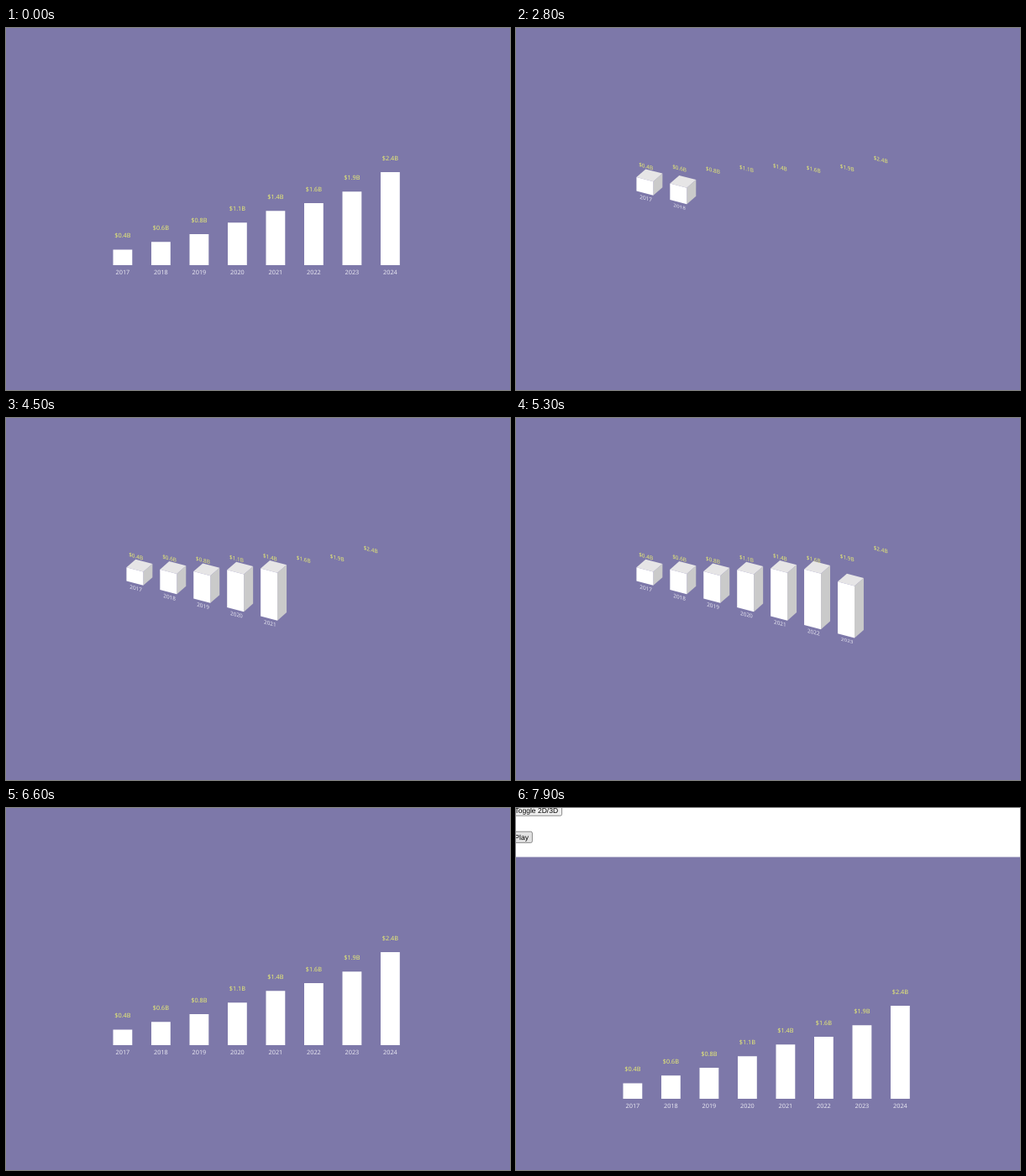
Animation of 600 by 432 pixels, one loop 8000 ms. Source, as an HTML page with a canvas:

```html
<!DOCTYPE html>
<html lang="en">
<head>
<meta charset="utf-8">
<title>Revenue bars</title>
<style>
  html, body { margin: 0; width: 100%; height: 100%; overflow: hidden; background: #7d78a9; }
  canvas { display: block; width: 600px; height: 432px; }
</style>
</head>
<body>
<canvas id="stage"></canvas>
<script>
const W = 600, H = 432, LOOP = 8000, STEP = 100;
const PLAY = 2000, STOP = 6000, SPIN = 530;
const STAGGER = 500, GROW = 1000, TILT = 0.5;
const SCROLL_AT = 7600, SCROLL_TIME = 300, SCROLL = 64;

const VALUES = [0.4, 0.6, 0.8, 1.1, 1.4, 1.6, 1.9, 2.4];
const LEFT = 127.5, PITCH = 45.5, BAR = 22.8, BASE = 283, UNIT = 46.25;
const FRONT = -2.5, BACK = FRONT + BAR;
const CAP = 5.2;
const COLORS = {
  bg: '#7d78a9', front: '#ffffff', top: '#e6e5e6', side: '#cacaca',
  value: '#eff470', year: '#eeedf5'
};

const canvas = document.getElementById('stage');
const ctx = canvas.getContext('2d');
const dpr = window.devicePixelRatio || 1;
canvas.width = W * dpr;
canvas.height = H * dpr;
if ('textRendering' in ctx) ctx.textRendering = 'geometricPrecision';

const clamp = v => Math.min(1, Math.max(0, v));
const cubicOut = p => 1 - (1 - p) ** 3;
const smooth = p => p * p * (3 - 2 * p);
const backOut = p => 1 + 2 * (p - 1) ** 3 + (p - 1) ** 2;

function tiltAt(t) {
  const go = cubicOut(clamp((t - PLAY) / SPIN));
  const back = cubicOut(clamp((t - STOP) / SPIN));
  return TILT * (go - back);
}

function growthAt(t, i) {
  if (t <= PLAY) return 1;
  return backOut(clamp((t - PLAY - i * STAGGER) / GROW));
}

// Orthographic view, turned and pitched by the same angle
function makeView(angle) {
  const c = Math.cos(angle), s = Math.sin(angle);
  const project = (x, y, z) => [
    x * c + 140 * (1 - c) + (32.5 + z) * s,
    y * c + 138.7 * (1 - c) + (x - 140) * s * s - (163.8 + z) * c * s
  ];
  return { c, s, project };
}

function face(view, color, corners) {
  ctx.fillStyle = color;
  ctx.beginPath();
  for (const p of corners) ctx.lineTo(...view.project(...p));
  ctx.fill();
}

// Text hangs from its top edge y
function label(view, text, x, y, color, stretch = 1) {
  const { c, s, project } = view;
  ctx.save();
  ctx.transform(c, s * s, 0, c * stretch, ...project(x, y, 0));
  ctx.font = '7.3px "Open Sans", sans-serif';
  ctx.textAlign = 'center';
  ctx.fillStyle = color;
  ctx.fillText(text, 0, CAP);
  ctx.restore();
}

function drawBar(view, i, growth) {
  const x = LEFT + i * PITCH, r = x + BAR, mid = x + BAR / 2;
  const full = VALUES[i] * UNIT, y = BASE - full * growth;
  if (growth > 0.001) {
    if (view.s > 0.001) {
      face(view, COLORS.side, [[r, y, FRONT], [r, y, BACK], [r, BASE, BACK], [r, BASE, FRONT]]);
      face(view, COLORS.top, [[x, y, FRONT], [x, y, BACK], [r, y, BACK], [r, y, FRONT]]);
    }
    face(view, COLORS.front, [[x, y, FRONT], [r, y, FRONT], [r, BASE, FRONT], [x, BASE, FRONT]]);
    label(view, String(2017 + i), mid, 288.4, COLORS.year, growth);
  }
  label(view, `$${VALUES[i].toFixed(1)}B`, mid, BASE - full - 17 - CAP / 2, COLORS.value);
}

function button(text, right, y, width, fill) {
  ctx.beginPath();
  ctx.roundRect(right - width, y, width, 13.2, 1.8);
  ctx.fillStyle = fill;
  ctx.fill();
  ctx.lineWidth = 0.8;
  ctx.strokeStyle = '#707070';
  ctx.stroke();
  ctx.font = '8.53px "Liberation Sans", Arial, sans-serif';
  ctx.textAlign = 'right';
  ctx.fillStyle = '#000';
  ctx.fillText(text, right - 4.5, y + 9.6);
}

function drawToolbar() {
  ctx.fillStyle = '#fff';
  ctx.fillRect(0, -SCROLL, W, 58.5);
  button('Toggle 2D/3D', 54.6, -4 - SCROLL, 60, '#efefef');
  button('Play', 19.4, 28.2 - SCROLL, 25, '#e2e2e2');
}

function draw(t) {
  ctx.setTransform(dpr, 0, 0, dpr, 0, 0);
  ctx.fillStyle = COLORS.bg;
  ctx.fillRect(0, 0, W, H);
  ctx.translate(0, SCROLL * smooth(clamp((t - SCROLL_AT) / SCROLL_TIME)));
  const view = makeView(tiltAt(t));
  VALUES.forEach((_, i) => drawBar(view, i, growthAt(t, i)));
  drawToolbar();
}

const start = performance.now();
function tick() {
  const t = (performance.now() - start + 5) % LOOP;
  draw(Math.floor(t / STEP) * STEP);
  requestAnimationFrame(tick);
}
tick();
</script>
</body>
</html>
```
